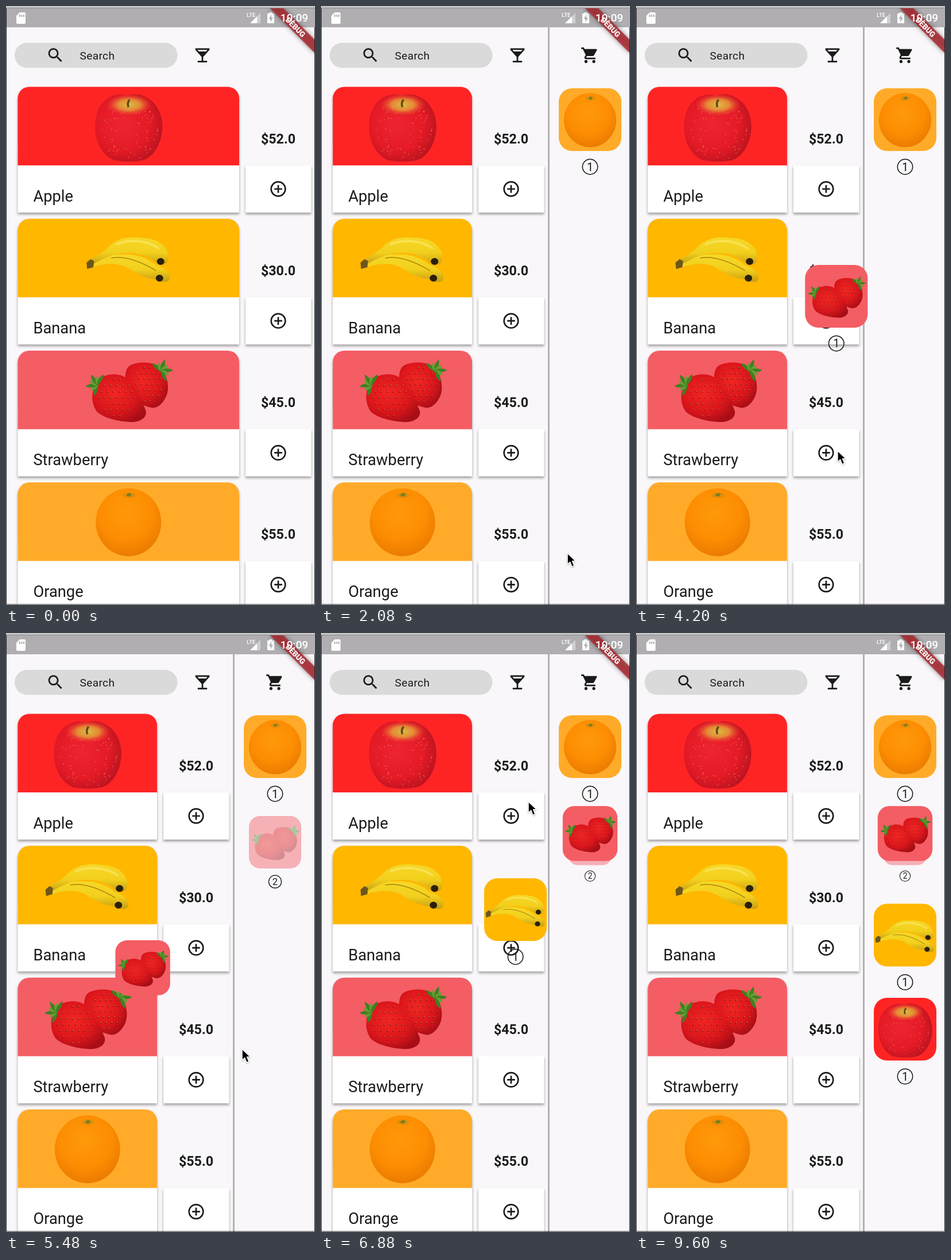
Write an HTML page that moves like this. It is 538 px wide and 1041 px high and loops after 9640 ms.

```html
<!DOCTYPE html>
<html lang="en">
<head>
<meta charset="utf-8">
<title>Fruit shop</title>
<style>
html, body { margin: 0; width: 100%; height: 100%; overflow: hidden; background: #f9f7fa; }
svg { display: block; width: 538px; height: 1041px; }
text { font-family: Roboto, sans-serif; fill: #1b1b1b; }
.card { filter: drop-shadow(0 3px 2px rgba(0,0,0,.36)); }
.name { font-size: 27.3px; }
.price { font-size: 23.2px; font-weight: 700; text-anchor: middle; }
.line { fill: none; stroke: #1b1b1b; stroke-width: 2.7; }
.count { fill: none; stroke: #111; stroke-width: 1.5; }
.num { font-size: 20px; text-anchor: middle; }
.banner { filter: drop-shadow(0 0 4px rgba(0,0,0,.5)); }
</style>
</head>
<body>
<svg viewBox="0 0 538 1041" xmlns="http://www.w3.org/2000/svg">
  <defs>
    <radialGradient id="gApple" cx=".42" cy=".45" r=".6">
      <stop offset="0" stop-color="#ee2430"/><stop offset=".65" stop-color="#e41a26"/><stop offset="1" stop-color="#bd1420"/>
    </radialGradient>
    <radialGradient id="gGlow">
      <stop offset="0" stop-color="#d8c040"/><stop offset=".5" stop-color="#e69a38" stop-opacity=".85"/><stop offset="1" stop-color="#ee4030" stop-opacity="0"/>
    </radialGradient>
    <radialGradient id="gOrange" cx=".46" cy=".36" r=".66">
      <stop offset="0" stop-color="#ff990a"/><stop offset=".6" stop-color="#fd8d02"/><stop offset="1" stop-color="#ea7a00"/>
    </radialGradient>
    <linearGradient id="gBanana" x1="0" y1="0" x2="0" y2="1">
      <stop offset="0" stop-color="#f6d826"/><stop offset=".55" stop-color="#f2cf1d"/><stop offset="1" stop-color="#c79d12"/>
    </linearGradient>
    <radialGradient id="gBerry" cx=".42" cy=".4" r=".65">
      <stop offset="0" stop-color="#f02622"/><stop offset=".6" stop-color="#dc161b"/><stop offset="1" stop-color="#a80e16"/>
    </radialGradient>
    <g id="Apple"></g>
    <g id="Banana">
      <path fill="url(#gBanana)" d="M-66 9C-48-2-30-7-14-6C10-8 30-2 46 11C62 16 74 26 71 38C66 44 56 42 47 37C30 35 14 28 0 18C-16 8-40 8-62 16Z"/>
      <path fill="none" stroke="#a8840f" stroke-width="1.500" d="M-30 0C-8-4 18 4 48 22"/>
      <path fill="url(#gBanana)" d="M-71 6C-56-4-46-8-36-18C-22-34-2-38 24-35C48-34 67-24 69-4C70 9 64 15 50 9C36-3 16-10-4-9C-28-8-46 2-66 13Z"/>
      <path fill="none" stroke="#fbe767" stroke-width="4" stroke-linecap="round" opacity=".7" d="M-20-24C0-33 32-31 52-17"/>
      <path fill="#6d561a" d="M-73 8L-66 2L-60 5L-61 16L-72 19Z"/>
      <ellipse cx="56" cy="6" rx="6.500" ry="6" fill="#2a200c"/>
      <ellipse cx="54" cy="35" rx="6.500" ry="6" fill="#2a200c"/>
    </g>
    <g id="Strawberry"></g>
    <g id="Orange">
      <ellipse cy="1" rx="57" ry="59" fill="url(#gOrange)"/>
      <ellipse cx="1" cy="-46" rx="11" ry="5" fill="#d98a10" opacity=".7"/>
      <path fill="#77801f" d="M-4-47L1-50L6-48L3-44L-2-44Z"/>
    </g>
  </defs>
  <rect width="538" height="1041" fill="#f9f7fa"/>
  <rect x="15" y="64" width="283.5" height="43.5" rx="21.75" fill="#dadada"/>
  <g fill="#1b1b1b">
    <path transform="translate(69.6 69.2) scale(1.366)" d="M15.5 14h-.79l-.28-.27C15.41 12.59 16 11.11 16 9.5 16 5.91 13.09 3 9.5 3S3 5.91 3 9.5 5.91 16 9.5 16c1.61 0 3.09-.59 4.23-1.57l.27.28v.79l5 4.99L20.49 19l-4.99-5zm-6 0C7.01 14 5 11.99 5 9.5S7.01 5 9.5 5 14 7.01 14 9.5 11.99 14 9.5 14z"/>
    <path transform="translate(325.6 69.4) scale(1.366)" d="M21 5V3H3v2l8 9v5H6v2h12v-2h-5v-5l8-9zM7.43 7L5.66 5h12.69l-1.78 2H7.43z"/>
  </g>
  <text x="128.600" y="92.700" font-size="19.100" letter-spacing=".34">Search</text>
  <g id="list"></g>
  <g id="panel">
    <rect x="395" y="37" width="143" height="1004" fill="#f9f7fa"/>
    <rect x="395" y="37" width="3" height="1004" fill="#b2b0b3"/>
    <path fill="#1b1b1b" transform="translate(451.8 69.2) scale(1.366)" d="M7 18c-1.1 0-1.99.9-1.99 2S5.9 22 7 22s2-.9 2-2-.9-2-2-2zM1 2v2h2l3.6 7.59-1.35 2.45c-.16.28-.25.61-.25.96 0 1.1.9 2 2 2h12v-2H7.42c-.14 0-.25-.11-.25-.25l.03-.12.9-1.63h7.45c.75 0 1.41-.41 1.75-1.03l3.58-6.49c.08-.14.12-.31.12-.48 0-.55-.45-1-1-1H5.21l-.94-2H1zm16 16c-1.1 0-1.99.9-1.99 2s.89 2 1.99 2 2-.9 2-2-.9-2-2-2z"/>
  </g>
  <g id="tiles"></g>
  <rect width="538" height="37" fill="#b0aeb1"/>
  <rect width="538" height="3" fill="#c6c5c8"/>
  <rect y="3" width="538" height="1" fill="#8b8a8c"/>
  <g fill="#fff">
    <path fill-rule="evenodd" d="M24 11H32Q34 11 34 13V29Q34 31 32 31H20Q18 31 18 29V17ZM23 15V19H25V15ZM26.500 15V19H28.500V15ZM30 15V19H32V15Z"/>
    <path d="M425 30L443 12V30Z" opacity=".4"/>
    <path d="M425 30L437 18V30Z"/>
    <path fill-rule="evenodd" d="M458.500 11H463.500V13H467V30H455V13H458.500ZM462 15L457.500 22.500H460.500V28L465 20.500H462Z"/>
  </g>
  <text x="419" y="19" font-size="9.5" font-weight="500" style="fill:#fff">LTE</text>
  <svg y="4" width="537" height="1037">
    <g transform="translate(537 0) rotate(45)">
      <rect class="banner" x="-54.600" y="38.200" width="109.200" height="16.400" fill="#a92a31" fill-opacity=".86"/>
      <text y="51.200" font-size="13.200" font-weight="900" text-anchor="middle" style="fill:#fff">DEBUG</text>
    </g>
  </svg>
  <text x="477.500" y="27" font-size="19.200" font-weight="500" style="fill:#fff">10:09</text>
  <g id="pointer">
    <path d="M0 0V19.500L4.600 15.300L8 23.500L12 21.800L8.600 13.800H14.500Z" fill="#000" stroke="#fff" stroke-width="1.500" stroke-linejoin="round" style="filter:drop-shadow(0 1px 1px rgba(0,0,0,.3))"/>
  </g>
  <path fill="none" stroke="#222" d="M.5 4V1040M0 1040H538M537.500 37V1040"/>
</svg>
<script>
const LOOP = 9640, FLIGHT = 900, SLIDE = 143, PITCH = 229.2;
const $ = id => document.getElementById(id);
const clamp = v => Math.min(1, Math.max(0, v));
const ease = u => u * u * (3 - 2 * u);
const mix = (a, b, p) => a + (b - a) * p;

function add(parent, tag, attrs = {}, text) {
  const el = document.createElementNS('http://www.w3.org/2000/svg', tag);
  for (const k in attrs) el.setAttribute(k, attrs[k]);
  if (text) el.textContent = text;
  parent.appendChild(el);
  return el;
}
const move = (el, x, y, s = 1) => el.setAttribute('transform', `translate(${x} ${y}) scale(${s})`);
const show = (el, on) => el.setAttribute('display', on ? 'inline' : 'none');

let seed = 7;
const rand = () => (seed = seed * 16807 % 2147483647) / 2147483647;

function drawApple() {
  const g = $('Apple');
  add(g, 'path', { fill: 'url(#gApple)', d: 'M-2-53C8-58 24-56 36-47C52-37 60-16 59 4C58 26 48 46 34 55C24 63-8 63-26 59C-44 52-58 28-58 4C-59-18-52-38-36-48C-24-56-10-57-2-53Z' });
  add(g, 'ellipse', { cx: 1, cy: -37, rx: 40, ry: 19, fill: 'url(#gGlow)' });
  for (let i = 0; i < 80; i++) {
    const a = rand() * 6.283, r = 14 + 38 * Math.sqrt(rand());
    add(g, 'circle', { cx: (Math.cos(a) * r).toFixed(1), cy: (8 + Math.sin(a) * r).toFixed(1), r: .9, fill: '#f5896a', opacity: .65 });
  }
  add(g, 'path', { d: 'M0-33Q-3-40 2-46', fill: 'none', stroke: '#5f4a18', 'stroke-width': 3.5 });
}

function leaves(g, x, y, angle, spread) {
  for (let i = -3; i <= 3; i++) {
    const len = i % 2 ? 21 : 15;
    add(g, 'path', {
      transform: `translate(${x} ${y}) rotate(${angle + i * spread})`, fill: i % 2 ? '#3f8022' : '#64a035',
      d: `M-3 0Q${len / 2}-7 ${len} 0Q${len / 2} 6-3 0Z`
    });
  }
}

function drawBerry(g, d, cx, cy, rx, ry) {
  add(g, 'path', { d, fill: 'url(#gBerry)' });
  for (let row = -3; row <= 3; row++) for (let col = -3; col <= 3; col++) {
    const u = (col + (row & 1) / 2) / 3.6, v = row / 3.6;
    if (u * u + v * v > .8) continue;
    add(g, 'ellipse', { cx: cx + u * rx, cy: cy + v * ry, rx: 1.2, ry: 1.6, fill: '#96121a' });
    add(g, 'circle', { cx: cx + u * rx + .8, cy: cy + v * ry - 1, r: .7, fill: '#f0a060' });
  }
}

function drawStrawberry() {
  const g = $('Strawberry');
  drawBerry(g, 'M4-43C18-50 42-49 54-40C66-30 72-8 67 8C61 24 50 33 40 31C24 28 6 18 0 2C-8-16-8-37 4-43Z', 32, -9, 34, 35);
  leaves(g, 57, -33, -38, 34);
  drawBerry(g, 'M-42-24C-26-30-8-27 1-16C12-2 24 20 30 36C33 46 24 55 8 56C-14 56-42 50-55 38C-66 22-65 2-56-12C-52-20-48-22-42-24Z', -21, 14, 38, 38);
  leaves(g, -54, -9, 205, 32);
}
drawApple();
drawStrawberry();

const fruits = [
  { name: 'Apple', price: '$52.0', color: '#ff2424', fit: .8 },
  { name: 'Banana', price: '$30.0', color: '#ffb700', fit: .71 },
  { name: 'Strawberry', price: '$45.0', color: '#f45d64', fit: .665 },
  { name: 'Orange', price: '$55.0', color: '#ffab29', fit: .8 }
];
const imageY = i => 208.7 + i * PITCH;

const rows = fruits.map((f, i) => {
  const g = add($('list'), 'g', { transform: `translate(0 ${140.5 + i * PITCH})` });
  const card = add(g, 'g', { class: 'card' });
  const base = add(card, 'rect', { x: 20.5, y: 100, height: 118.5, fill: '#fff' });
  const top = add(card, 'path', { fill: f.color });
  const pic = add(g, 'use', { href: '#' + f.name });
  add(g, 'text', { class: 'name', x: 47.4, y: 199.1 }, f.name);
  const side = add(g, 'g');
  add(side, 'text', { class: 'price', x: 474, y: 98.3 }, f.price);
  add(side, 'rect', { class: 'card', x: 417, y: 136.5, width: 114.5, height: 82, fill: '#fff' });
  add(side, 'circle', { class: 'line', cx: 474, cy: 177.5, r: 12.3 });
  add(side, 'path', { class: 'line', d: 'M467.2 177.5h13.6M474 170.7v13.6' });
  return { base, top, pic, side };
});

// A tile is drawn around its own centre; the counter sits 82 below.
function makeTile(i, counted) {
  const g = add($('tiles'), 'g'), f = fruits[i];
  const face = add(g, 'g');
  add(face, 'rect', { x: -54.5, y: -54.5, width: 109, height: 109, rx: 23, fill: f.color });
  add(face, 'use', { href: '#' + f.name, transform: `scale(${f.fit})` });
  let num;
  if (counted) {
    add(g, 'circle', { class: 'count', cy: 82, r: 13.2 });
    num = add(g, 'text', { class: 'num', y: 89 }, '1');
  }
  return { g, face, num };
}

const CART_X = 468.5, slotY = n => 197.5 + n * 163.7;
const flights = [
  { fruit: 3, start: 950, from: [213, imageY(3)], to: slotY(0), size: 1 },
  { fruit: 2, start: 3732, from: [213, imageY(2)], to: slotY(1), size: 1 },
  { fruit: 2, start: 5165, from: [147, 674], to: 348.5, size: .875, extra: true },
  { fruit: 1, start: 6436, from: [213, imageY(1)], to: slotY(2), size: 1 },
  { fruit: 0, start: 7416, from: [213, imageY(0)], to: slotY(3), size: 1 }
];
for (const f of flights) f.tile = makeTile(f.fruit, !f.extra);
const under = flights[1], over = flights[2];

// time, x, y of the pointer tip
const route = [
  [300, 510, 1045], [800, 475, 1003], [1500, 475, 1003], [2080, 429, 951],
  [3200, 333, 776], [3800, 333, 776], [4200, 351, 773], [4900, 334, 777],
  [5200, 334, 777], [5480, 411, 723], [6250, 333, 547], [6480, 333, 547],
  [6880, 361, 293], [7150, 333, 317], [7440, 333, 317], [7880, 412, 145], [8400, 545, 50]
];

function drawPointer(t) {
  const n = route.findIndex(k => k[0] > t);
  show($('pointer'), n > 0);
  if (n < 1) return;
  const a = route[n - 1], b = route[n], p = ease((t - a[0]) / (b[0] - a[0]));
  move($('pointer'), mix(a[1], b[1], p), mix(a[2], b[2], p));
}

function drawLayout(t) {
  const open = ease(clamp((t - 900) / 300)), shift = SLIDE * open, w = 385.5 - shift;
  for (const r of rows) {
    r.base.setAttribute('width', w);
    r.top.setAttribute('d', `M20.5 136.5V20a20 20 0 0 1 20-20h${w - 40}a20 20 0 0 1 20 20v116.5z`);
    move(r.pic, 20.5 + w / 2, 68.2);
    move(r.side, -shift, 0);
  }
  move($('panel'), SLIDE - shift, 0);
  show($('panel'), open > 0);
}

function drawTiles(t) {
  for (const f of flights) {
    const p = ease(clamp((t - f.start) / FLIGHT));
    show(f.tile.g, t >= f.start);
    move(f.tile.g, mix(f.from[0], CART_X, p), mix(f.from[1], f.to, p), f.size);
  }
  // The first strawberry shrinks and fades behind the second one.
  const u = clamp((t - over.start) / FLIGHT);
  if (u > 0) {
    const s = 1 - .31 * (1 - (1 - u) ** 1.75);
    move(under.tile.g, CART_X, 376 + s * (under.to - 376), s);
  }
  under.tile.face.setAttribute('opacity', mix(1, .45, clamp(u / .3)));
  under.tile.num.textContent = u > 0 ? '2' : '1';
}

function frame(now) {
  const t = now % LOOP;
  drawLayout(t);
  drawTiles(t);
  drawPointer(t);
  requestAnimationFrame(frame);
}
frame(0);
</script>
</body>
</html>
```
